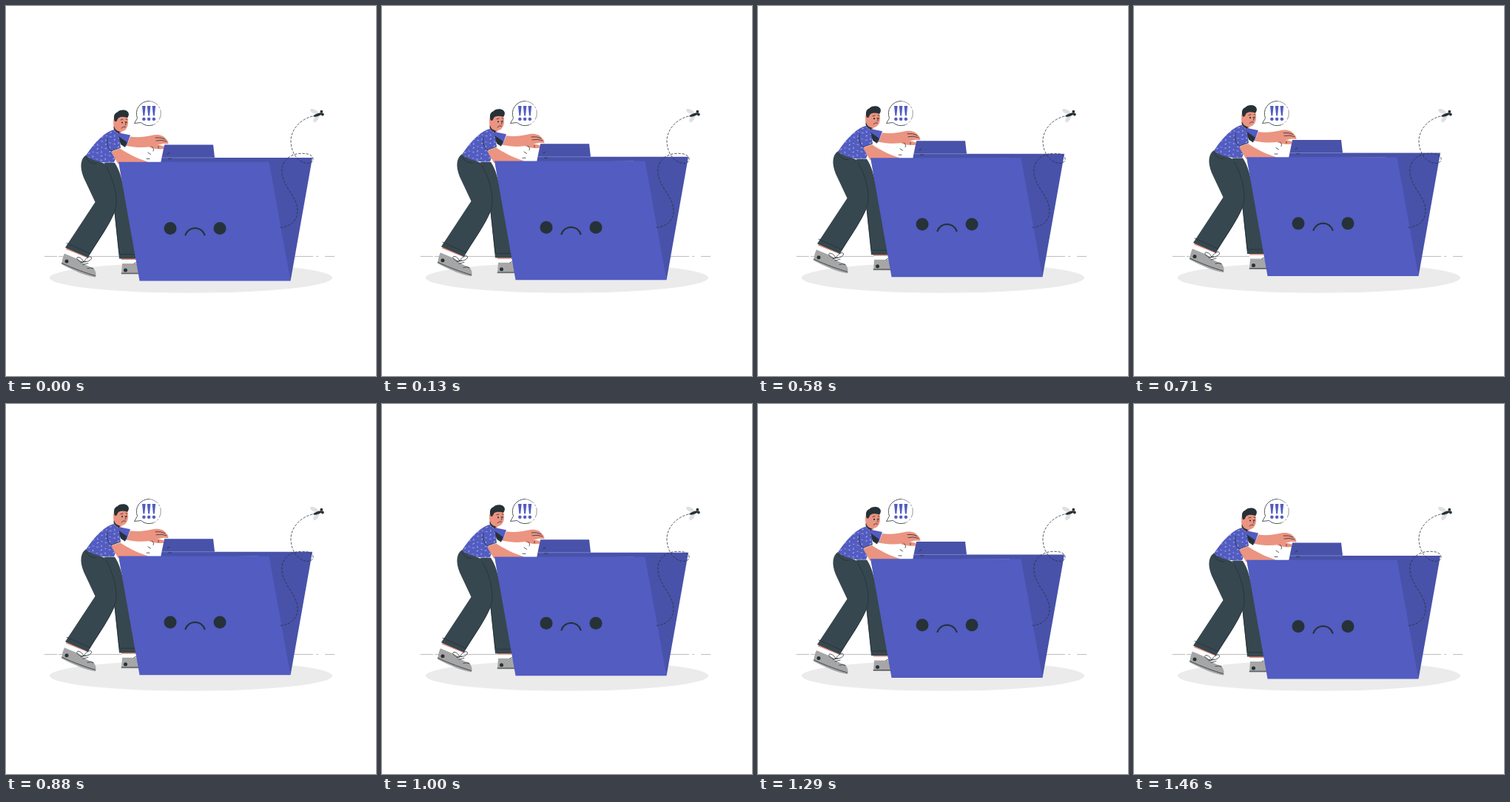
An HTML page that plays this animation: 500x500 px, repeating every 1500 ms.

```html
<!DOCTYPE html>
<html lang="en">
<head>
<meta charset="utf-8">
<title>Sad folder</title>
<style>
  html, body { margin: 0; height: 100%; overflow: hidden; background: #fff; }
  svg { display: block; width: 100%; height: 100%; }
  .ink { fill: #263238; }
  .blue { fill: #525cc1; }
  .shade { fill: #4852a9; }
  .skin { fill: #eb9481; }
  .pants { fill: #37474f; }
  .shoe { fill: #a6a6a6; }
  .line { fill: none; stroke: #263238; stroke-width: .8; stroke-linecap: round; stroke-linejoin: round; }
  text { font: bold 26.5px "Noto Serif", serif; text-anchor: middle; }
</style>
</head>
<body>
<svg viewBox="0 0 500 500">
  <defs>
    <pattern id="flecks" width="13" height="11" patternUnits="userSpaceOnUse" patternTransform="rotate(-28)">
      <path d="M2 2l1.4 .8M8 4.5l.4 -1.5M5 8.5h1.4M11 9l.9 .9" stroke="#e3e5f6" stroke-width=".8" stroke-linecap="round"/>
    </pattern>
  </defs>

  <ellipse cx="250" cy="367.3" rx="191" ry="20.4" fill="#ebebeb"/>
  <path d="M52 338.4H69M71 338.4H415M419 338.4H422M431 338.4H444" stroke="#777" stroke-width=".5"/>

  <g id="lift">
    <path class="shade" d="M209 212L214 187.5H280L282 205H414L384.5 371.5L340 211Z"/>
    <path d="M210.5 205H282" stroke="#8d94d6" stroke-width=".7"/>

    <g id="legs">
      <path class="skin" d="M156 340H176V345H156ZM83 324L112 336L111 341L81 329Z"/>
      <path fill="#fff" d="M156 343H178V349H156ZM82 329.5L111 341L108 348L79 336Z"/>
      <path class="shoe" d="M157 348H184V362.5H156Z"/>
      <path class="shoe" d="M79 334.5L98 342.5C104 348 110 352 117.5 353.5C121 357 122.5 362 121 366.5C110 365.5 90 357 75 349C76 343 77 338 79 334.5Z"/>
      <path class="line" d="M156 361.2H182M75.5 347.5C92 355 108 361 120.5 364.5M101 347L108 345M104 349.5L111 347.5M110 354.5Q115 353 118 355M173 348Q178 344 181 349"/>
      <path class="line" d="M104 346C95 345 94 339 98 339.5C102 340 104 344 105 346C108 340 114 337 115.5 340C116 344 109 346 105 346"/>
      <circle class="ink" cx="82" cy="345" r="2.5"/>
      <circle class="ink" cx="161.5" cy="357" r="2.5"/>
      <path class="pants" d="M133 212H147C154 222 157 236 160 250L176 341.5H153L146 274Z"/>
      <path class="pants" d="M108 201.5C101 206 99 217 105 232L120.5 265L80 326.5L111 340C122 321 146 288 149.5 270C151 250 143 229 135 214Z"/>
      <path class="line" d="M135 217C144 231 150 252 149 269C145 290 124 316 113 335M82 320.5L112.5 334M153 335.5H175M108 205Q113 214 122 213M147 279L153 334"/>
    </g>

    <g id="torso">
      <path class="skin" d="M145 158L146 168C150 175 156 174 157 168L156 160Z"/>
      <path class="blue" d="M151 171L168 174.5L163 189L150 183Z"/>
      <path class="ink" d="M152 176L163.5 184L161 191L155 187Z"/>
      <path id="shirt" class="blue" d="M146 167C135 170 122 181 108 202C116 209 132 213 146 211.5L148 206L143 196L155 191L152 174Z"/>
      <path fill="url(#flecks)" d="M146 167C135 170 122 181 108 202C116 209 132 213 146 211.5L148 206L143 196L155 191L152 174Z"/>
      <path class="line" d="M137 179C135 187 139 193 142 196L154.5 191.5"/>
      <path class="ink" d="M146 162C147 167 150 169 154 169.5L153 172.5C149 171 146 168 145.5 165Z"/>
    </g>

    <g id="arms">
      <path class="skin" d="M142 197L154 192.5C164 199 177 206 190 210L194 213H151C149 208 145 203 142 197Z"/>
      <path class="skin" d="M192 186C199 188 207 187 213 189.5L213 193C207 194 201 193 194 191Z"/>
      <path class="skin" d="M168 176.5C180 178.5 191 176 200 174.3C208 173 214 176 215 178.5C218 180.5 219.5 184 219.5 186.5L213 186C206 187 202 189 196 190C185 192 173 191 163 189Z"/>
      <path class="line" d="M202 178Q209 177 215 180M203 182Q210 180.5 217 183M206 189.5V192M197 190Q201 193 199 196"/>
      <path class="line" d="M192 198.2L195.5 200.5M190 206.5H194M218 200L220.8 198.5M219.5 206.3H223.5"/>
    </g>

    <g id="head">
      <path class="skin" d="M147 150C145 152 144 158 147 161C148 167 151 170 156 169.5C162 169 165 163 165 157L164 148L150 147Z"/>
      <path class="ink" d="M147 156C145 151 145.500 145 150.500 143.500C153 140 161 139.500 164 142.500C167 145 166 149 164 151C160 150 156 149 152.500 151C150.500 152 150.500 155 149 156Z"/>
      <path class="line" d="M155 154L158 153.200M162 153L164 153.500M161 157Q163.500 160.500 161 161M156 165Q158.500 162 161.500 163.500"/>
      <circle class="ink" cx="157" cy="157.500" r="1.100"/>
      <circle class="ink" cx="162.500" cy="157" r="1"/>
    </g>

    <path class="blue" d="M152 210.700H355.500L384.500 371.500H180.500Z"/>
    <circle class="ink" cx="222" cy="300.400" r="8.500"/>
    <circle class="ink" cx="289" cy="300.400" r="8.500"/>
    <path class="line" d="M242.500 309.500C247 297 264 297 268.500 309.500" style="stroke-width:2.200"/>
  </g>

  <g id="bubble">
    <path class="line" fill="#fff" d="M193 128.500A16.700 16.700 0 0 0 177.500 151.500L173.500 158.500L182.500 157.500A16.700 16.700 0 0 0 198 161"/>
    <path class="line" d="M193 128.500A16.700 16.700 0 0 1 198 161" style="stroke-width:.5" stroke-dasharray="13 3 2 3"/>
    <text class="blue" x="186.300 193 199.700" y="155">!!!</text>
  </g>

  <g id="fly">
    <path class="line" stroke-dasharray="2.600 2.600" d="M414 149C395 154 384 170 385 184C386 200 395 212 408 212.500C417 212 418 203 408 200C392 197 375 203 373 220C371 243 393 255 394 276C394 290 385 298 370 299.500"/>
    <g fill="#e0e0e0">
      <ellipse cx="416.500" cy="142.500" rx="6" ry="2.800" transform="rotate(25 416.500 142.500)"/>
      <ellipse cx="419" cy="152.500" rx="5.500" ry="2.800" transform="rotate(-55 419 152.500)"/>
    </g>
    <ellipse class="ink" cx="421.500" cy="147" rx="6.500" ry="1.900" transform="rotate(-18 421.500 147)"/>
    <circle class="ink" cx="426.300" cy="142.700" r="1.900"/>
    <circle class="ink" cx="427.800" cy="146.500" r="1.900"/>
  </g>
</svg>
<script>
  const LOOP = 1500, HALF = 730, RISE = 6.7;
  const lift = document.getElementById('lift');

  // Linear rise and fall, with a short rest before the loop restarts.
  function draw() {
    const t = performance.now() % LOOP;
    const height = RISE * Math.max(0, 1 - Math.abs(t - HALF) / HALF);
    lift.setAttribute('transform', `translate(0 ${-height})`);
    requestAnimationFrame(draw);
  }
  draw();
</script>
</body>
</html>
```
